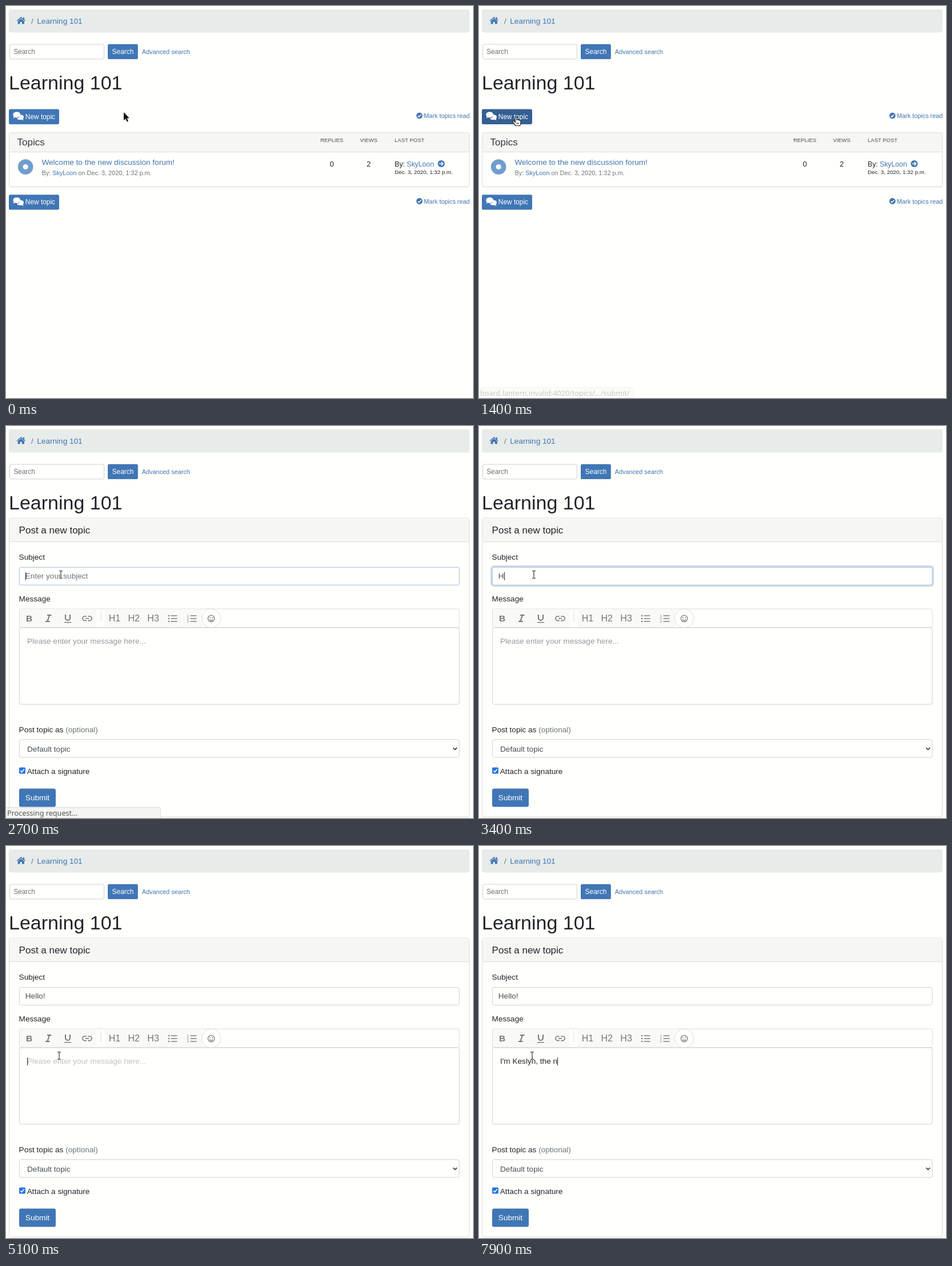
Animation of 817 by 686 pixels, one loop 8000 ms. Source, as an HTML page:

```html
<!DOCTYPE html>
<html lang="en">
<head>
<meta charset="utf-8">
<title>Forum: new topic</title>
<style>
html, body { margin: 0; width: 100%; height: 100%; overflow: hidden; background: #fffffc; }
svg { display: block; font-family: "Liberation Sans", Arial, sans-serif; }
text { white-space: pre; }
</style>
</head>
<body>
<svg id="stage" width="817" height="686" viewBox="0 0 817 686"></svg>
<script>
const LOOP = 8000, STEP = 100;
const INK = '#212529', MUTED = '#6c757d', LINK = '#4076b0', BUTTON = '#4076b5', HOVER = '#355f92';
const PAGE = '#fffffc', PANEL = '#f6f6f3', LINE = '#dcddda', FIELD = '#ced2d4', ICON = '#777';
const USER = 'SkyLoon', POSTED = 'Dec. 3, 2020, 1:32 p.m.';
const URL_HINT = 'board.lantern.invalid:4020/topics/…/submit/';

const text = (x, y, size, str, fill = INK, attrs = '') =>
  `<text x="${x}" y="${y}" font-size="${size}" fill="${fill}" ${attrs}>${str}</text>`;
const box = (x, y, w, h, fill, stroke = 'none', attrs = 'rx="3.4"') =>
  `<rect x="${x}" y="${y}" width="${w}" height="${h}" fill="${fill}" stroke="${stroke}" ${attrs}/>`;
const path = (d, stroke, width = 1, attrs = '') =>
  `<path d="${d}" fill="none" stroke="${stroke}" stroke-width="${width}" ${attrs}/>`;
const disc = (x, y, r, fill, attrs = '') => `<circle cx="${x}" cy="${y}" r="${r}" fill="${fill}" ${attrs}/>`;
const middle = 'text-anchor="middle"';

const home = `<path fill="${LINK}" d="M26.3 19 L30 22 V19.8 H32 V23.7 L34 25.4 L33.1 26.5
  L26.3 20.9 L19.5 26.5 L18.6 25.4 Z M26.3 22 L31.9 26.6 V31.6 H28 V27.8 H24.6 V31.6 H20.7 V26.6 Z"/>`;

const bubbles = y => `<g fill="#fff" transform="translate(0 ${y})">
  <path d="M24.5 9.6 C30 9.3 31.4 12.5 31 14.4 C30.8 15.6 30 16.5 29.5 17 C29.7 18 30.5 18.7 31 19.2
    C29.3 19.3 27.8 18.7 27 18.2 C23.5 19.2 20 18 19 15.8 C23 15.4 25.6 13 24.5 9.6 Z"/>
  <path d="M18.8 4.7 C22.7 4.7 25.2 7 25.2 9.7 C25.2 12.5 22.4 14.7 18.8 14.7 C17.6 14.7 16.6 14.5 15.7 14.1
    C14.8 14.8 13.6 15.3 12.2 15.2 C12.9 14.4 13.5 13.5 13.7 12.7 C12.8 11.8 12.3 10.8 12.3 9.7
    C12.3 7 15 4.7 18.8 4.7 Z"/></g>`;

const actions = (y, id) =>
  box(5, y, 88, 26.4, BUTTON, 'none', `rx="2.7" id="${id}"`) + bubbles(y) +
  text(33.8, Math.round(y + 17), 11.9, 'New topic', '#fff') +
  disc(723.3, y + 11.3, 5.4, LINK) +
  path(`M720.5 ${y + 11.5} l2 2 l3.8 -4`, PAGE, 1.5) +
  text(731, Math.round(y + 15.4), 10.88, 'Mark topics read', LINK);

const header =
  box(5, 6, 806, 40.4, '#e7ebea') + home +
  text(44, 31, 13.6, '/', MUTED) + text(54.3, 31, 13.6, 'Learning 101', LINK) +
  box(6.5, 67.1, 165, 25.8, PAGE, FIELD, 'rx="2.7"') + text(13.2, 84, 11.9, 'Search', MUTED) +
  box(178, 66.7, 52.8, 26.4, BUTTON, 'none', 'rx="2.7"') + text(185.6, 84, 11.9, 'Search', '#fff') +
  text(237.8, 84, 10.88, 'Advanced search', LINK) +
  text(5, 146, 34, 'Learning 101');

const list =
  actions(180.6, 'newTopic') +
  path('M6 317.2 H810', '#ebebe8', 1) +
  box(5.5, 221.5, 805, 94.5, PAGE, LINE) +
  box(6, 222, 804, 33, PANEL, 'none', 'rx="3"') + path('M6 255.5 H810', LINE) +
  text(19.6, 244, 17, 'Topics', '#343a40') +
  text(570, 238, 9.52, 'REPLIES', '#495057', middle) +
  text(634.6, 238, 9.52, 'VIEWS', '#495057', middle) +
  text(680, 238, 9.52, 'LAST POST', '#495057') +
  disc(34.2, 281.5, 13.3, '#709dce') + disc(34.2, 281.5, 4.6, PAGE) +
  text(62.4, 278, 13.6, 'Welcome to the new discussion forum!', LINK) +
  text(62.4, 296, 10.88, `By: <tspan fill="${LINK}">${USER}</tspan> on ${POSTED}`, MUTED) +
  text(570, 281, 12.8, '0', INK, middle) + text(634.6, 281, 12.8, '2', INK, middle) +
  text(680, 281, 12.24, `By: <tspan fill="${LINK}">${USER}</tspan>`) +
  disc(761.4, 276, 6.1, LINK) +
  path('M757.7 276 H764.4 M761.4 272.7 L764.7 276 L761.4 279.3', PAGE, 1.5) +
  text(680, 294, 9.79, POSTED) +
  actions(330.2, 'newTopicBelow');

const rows = (x, y) => [0, 5, 10].map(d => path(`M${x} ${y + d} h11`, ICON, 1.4)).join('');
const toolbar =
  box(23.5, 320, 769.5, 32.5, PAGE, LINE, 'rx="2"') +
  box(24, 320.5, 134, 31.5, '#f9f9f7', 'none', '') + box(173, 320.5, 170, 31.5, '#f9f9f7', 'none', '') +
  text(40.6, 342, 15.5, 'B', ICON, middle + ' font-weight="bold"') +
  path('M72 331 h7.5 M69 342 h7.5 M76 331 l-3.6 11', ICON, 2) +
  path('M104 330 v6 a4 4 0 0 0 8 0 v-6', ICON, 2) + path('M102 343.7 h12', ICON, 1.4) +
  path('M140.7 333 h-3 a3.8 3.8 0 0 0 0 7.6 h3 M143.3 333 h3 a3.8 3.8 0 0 1 0 7.6 h-3 M138.7 336.8 h6.6', ICON, 1.6) +
  path('M166 323 V343', LINE) +
  ['H1', 'H2', 'H3'].map((h, i) => text(190 + i * 33.8, 342, 16, h, ICON, middle)).join('') +
  rows(288.5, 332) + [0, 5, 10].map(d => disc(285, 332 + d, 1.3, ICON)).join('') +
  rows(322.5, 332) + [1, 2, 3].map(n => text(316.6, 329 + n * 5, 5.5, n, ICON)).join('') +
  disc(359, 336.5, 16.5, PAGE, `stroke="${LINE}"`) +
  disc(359, 337, 5.7, 'none', `stroke="${ICON}" stroke-width="1.2"`) +
  disc(357, 335.5, 0.9, ICON) + disc(361, 335.5, 0.9, ICON) +
  path('M355.9 338.5 q3.1 3.6 6.2 0', ICON, 1.2);

const form =
  `<rect id="card" x="5.5" y="161" width="805" rx="3.4" fill="${PAGE}" stroke="${LINE}"/>` +
  box(6, 161.5, 804, 41, PANEL, 'none', 'rx="3"') + path('M6 202.5 H810', LINE) +
  text(22.6, 188, 17, 'Post a new topic') +
  text(22.6, 234, 13.6, 'Subject') +
  box(21.6, 245.6, 773, 34.2, 'none', '#c9dbec', 'rx="5" stroke-width="3" id="ring"') +
  box(23.4, 247.3, 769.6, 31, PAGE, FIELD, 'rx="3.4" id="subjectBox"') +
  text(33.8, 267, 13.6, '', INK, 'id="subject"') +
  box(0, 256, 1, 14, '#222', 'none', 'id="subjectCaret"') +
  text(22.6, 307, 13.6, 'Message') +
  '<g id="rest">' + toolbar +
  box(23.4, 353, 769.6, 134, PAGE, FIELD) +
  text(37, 381, 13.6, '', INK, 'id="message"') +
  box(0, 370, 1, 14, '#222', 'none', 'id="messageCaret"') +
  text(22.6, 536, 13.6, `Post topic as <tspan fill="${MUTED}">(optional)</tspan>`) +
  box(23.4, 548.8, 769.6, 31.2, PAGE, FIELD) +
  text(37, 570, 13.6, 'Default topic', '#495057') +
  path('M782.2 563 l3.4 3.4 l3.4 -3.4', '#333', 1.7) +
  box(23, 597.5, 11, 11, '#2777e0', 'none', 'rx="1.7"') + path('M25.3 603.2 l2.3 2.4 l4.3 -5', '#fff', 1.6) +
  text(36.8, 609, 13.6, 'Attach a signature') +
  box(23, 634.6, 64, 32, BUTTON) + text(55, 655, 13.6, 'Submit', '#fff', middle) +
  '</g>';

const status = '<g id="status">' +
  box(-4, 667.7, 274.2, 24, '#f4f5f2', '#d9dad6', 'rx="2"') +
  text(2, 682, 12.65, '', '#555', 'id="statusText" font-family="Noto Sans, Open Sans, sans-serif"') + '</g>';

const pointers =
  `<g id="arrow"><path d="M0 0 V14.2 L3.2 11.2 L5.6 16.6 L8 15.5 L5.6 10.3 H9.8 Z"
    fill="#111" stroke="#fff" stroke-width="1" paint-order="stroke"/></g>
  <g id="hand"><path d="M-1.6 1 C-1.6 -.6 1 -.6 1 1 V5.2 C2 4.3 3.4 4.6 3.7 5.6 C4.7 4.9 6 5.4 6.1 6.3
    C7.2 5.9 8 6.6 8 7.6 V10.6 C8 13 6.8 13.8 6.6 15.5 H-1.4 C-2 13.2 -5 11 -6 8.8 C-6.6 7.2 -4.6 6.5 -3.6 7.7
    L-1.6 9.6 Z" fill="#fff" stroke="#222" stroke-width="1.2"/>
    <path d="M1.3 10 v3 M3.6 10 v3" stroke="#222" fill="none"/></g>
  <g id="beam">` +
  ['#fff', '#333'].map((c, i) =>
    path('M-3 -6.5 H-1.2 L0 -5.5 L1.2 -6.5 H3 M0 -5.5 V5.5 M-3 6.5 H-1.2 L0 5.5 L1.2 6.5 H3', c, i ? 1.2 : 2.4)).join('') +
  '</g>';

document.getElementById('stage').innerHTML =
  header + `<g id="list">${list}</g><g id="form">${form}</g>` + status + pointers;

const el = id => document.getElementById(id);
const show = (id, on) => el(id).setAttribute('visibility', on ? 'inherit' : 'hidden');
const ramp = (t, from, to) => Math.min(1, Math.max(0, (t - from) / (to - from)));
const lastBefore = (t, keys) => keys.reduce((found, key) => t >= key[0] ? key : found, keys[0]);

// [time, x, y] of the pointer's hot spot
const route = [
  [0, 206, 186], [400, 206, 186], [700, 161, 218], [800, 161, 218], [1200, 68, 196], [1300, 65, 194],
  [1800, 65, 194], [2100, 73, 201], [2500, 96, 260], [4500, 96, 260], [4600, 100, 314],
  [4700, 101, 330], [4900, 93, 367], [LOOP, 93, 367]
];
// [time, number of characters]
const SUBJECT = 'Hello!', MESSAGE = "I'm Keslyn, the n";
const subjectKeys = [[0, 0], [3400, 1], [3500, 3], [3700, 4], [3900, 5], [4100, 6]];
const messageKeys = [[0, 0], [5600, 1], [5900, 3], [6100, 4], [6200, 5], [6300, 6], [6400, 7], [6600, 8],
  [6700, 9], [6800, 10], [7100, 12], [7300, 13], [7400, 14], [7600, 15], [7800, 16], [7900, 17]];

function pointerAt(t) {
  const i = route.findIndex(key => key[0] > t);
  const [t0, x0, y0] = route[i - 1], [t1, x1, y1] = route[i];
  const k = ramp(t, t0, t1);
  return [x0 + (x1 - x0) * k, y0 + (y1 - y0) * k];
}

function pointerKind(x, y, onForm) {
  if (!onForm) return x < 93 && y > 181 && y < 207 ? 'hand' : 'arrow';
  if (y > 352 || (y > 247 && y < 279)) return 'beam';
  return y > 312 ? 'hand' : 'arrow';
}

function typeField(id, count, full, hint, hintFill, fill, caretOn) {
  const field = el(id);
  const typed = full.slice(0, count);
  field.textContent = typed;
  const end = +field.getAttribute('x') + (count ? field.getComputedTextLength() : 0);
  field.textContent = typed || hint;
  field.setAttribute('fill', typed ? fill : hintFill);
  el(id + 'Caret').setAttribute('x', Math.round(end + 0.3));
  show(id + 'Caret', caretOn);
}

function render(t) {
  const onForm = t >= 1900, loaded = t >= 2400;
  show('list', !onForm);
  show('form', onForm);
  el('rest').setAttribute('display', loaded ? 'inline' : 'none');
  el('card').setAttribute('height', loaded ? 523 : 189.3);

  const [x, y] = pointerAt(t), kind = pointerKind(x, y, onForm);
  for (const id of ['arrow', 'hand', 'beam']) {
    show(id, id === kind);
    el(id).setAttribute('transform', `translate(${Math.round(x)} ${Math.round(y)})`);
  }
  el('newTopic').setAttribute('fill', kind === 'hand' ? HOVER : BUTTON);

  show('status', t >= 1400 && t < 2800);
  el('status').setAttribute('opacity', 0.32 + 0.68 * ramp(t, 1400, 1500));
  el('statusText').textContent = t < 1700 ? URL_HINT : 'Processing request…';

  const focus = ramp(t, 2600, 2900) * (1 - ramp(t, 4900, 5100));
  el('ring').setAttribute('opacity', focus * focus);
  el('subjectBox').setAttribute('stroke', focus > 0.2 ? '#a9c1d6' : FIELD);
  typeField('subject', lastBefore(t, subjectKeys)[1], SUBJECT, 'Enter your subject', MUTED, '#495057',
    onForm && t >= 2600 && t < 4600 && !(t >= 3200 && t < 3400));
  typeField('message', lastBefore(t, messageKeys)[1], MESSAGE, 'Please enter your message here...',
    t < 5000 ? '#95999f' : '#bfc1c5', INK, t >= 5000);
}

const start = performance.now();
function tick() {
  const t = (performance.now() - start) % LOOP;
  render(Math.floor(t / STEP) * STEP);
  requestAnimationFrame(tick);
}
tick();
</script>
</body>
</html>
```
